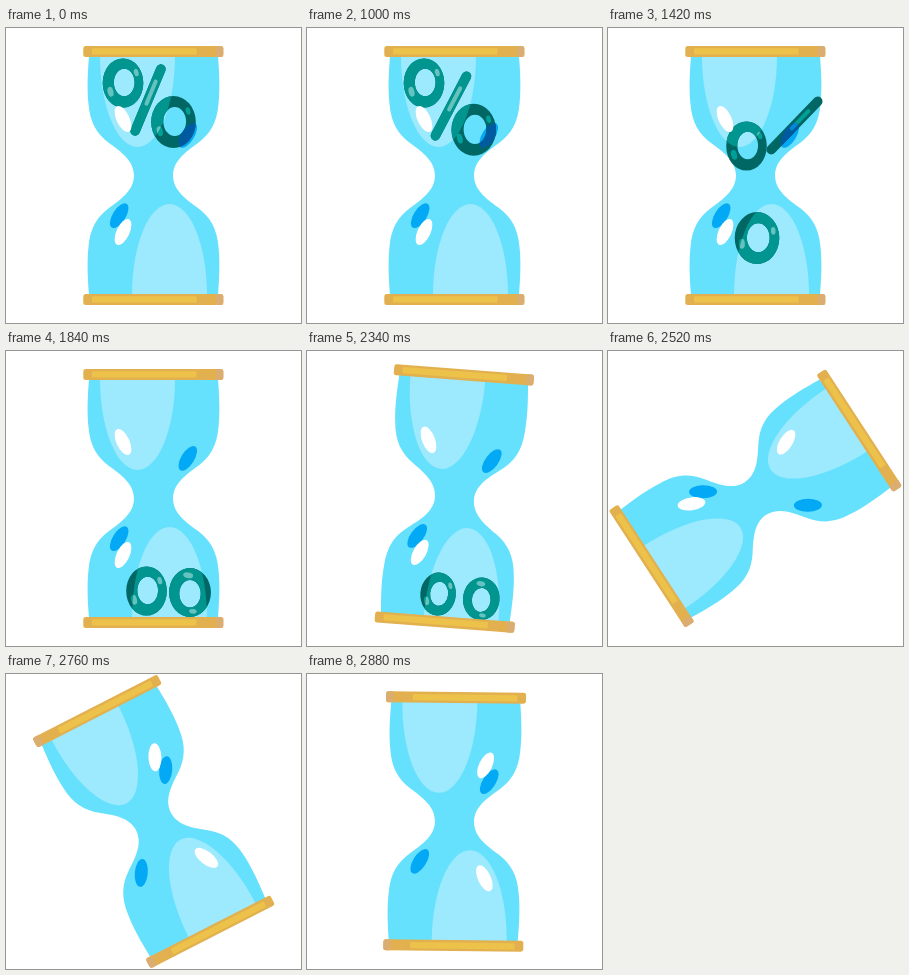
Recreate the animation shown at these times as an HTML page with a canvas. Size 295 px wide and 295 px high, loop 2940 ms.

```html
<!DOCTYPE html>
<html lang="en">
<head>
<meta charset="utf-8">
<title>Percent hourglass</title>
<style>
html, body { margin: 0; width: 100%; height: 100%; overflow: hidden; background: #fff; }
canvas { display: block; width: 100%; height: 100%; }
</style>
</head>
<body>
<canvas></canvas>
<script>
const SIZE = 295, MID = SIZE / 2, LOOP = 2940, STEP = 60;
const FALL_START = 1000, FLIP_START = 2340, LAST_FALL = 15;
const canvas = document.querySelector('canvas');
const ctx = canvas.getContext('2d');

const rad = degrees => degrees * Math.PI / 180;
const smooth = p => p * p * (3 - 2 * p);
// Progress from 0 to 1 while step runs from start to end.
const span = (step, start, end, power = 1) =>
  Math.max(0, Math.min(1, (step - start) / (end - start))) ** power;

function oval(x, y, rx, ry, tilt = 0) {
  const path = new Path2D();
  path.ellipse(x, y, rx, ry, rad(tilt), 0, 2 * Math.PI);
  return path;
}

// Joins a shape with its copy turned upside down, or mirrored top to bottom.
function doubled(shape, scaleX = -1) {
  const path = new Path2D(shape);
  path.addPath(shape, new DOMMatrix([scaleX, 0, 0, -1, scaleX < 0 ? SIZE : 0, SIZE]));
  return path;
}

const glass = doubled(new Path2D(`M83 28C81.5 47 81 62 82.5 76C84 95 91 106 103 115
  C116 124.5 128 133 128 148H167C167 133 179 124.5 192 115
  C204 106 211 95 212.5 76C214 62 213.5 47 212 28Z`));
const panels = doubled(new Path2D('M94 28A37.5 91 0 0 0 169 28Z'));
const blueSpots = doubled(oval(181.8, 107.3, 6.5, 14, 32));
const whiteSpots = doubled(oval(117, 91, 6.5, 14, -25), 1);

// Slides along the left wall, drops through the neck and settles.
function upperRing(step) {
  const slide = span(step, 1, 8), drop = span(step, 8, 12, 1.3), settle = span(step, 12, 15);
  return {
    x: 117 + 21.5 * slide - 22 * Math.sin(Math.PI * slide) - 12.5 * drop + 14.5 * settle,
    y: 55 + 63 * slide + 122 * drop,
    angle: 0, rx: 20.3, ry: 24.6
  };
}

// Sinks into the neck, drops and rolls to the right.
function lowerRing(step) {
  const roll = span(step, 8, LAST_FALL), size = 1 - 0.06 * roll;
  return {
    x: 167.5 - 18.5 * span(step, 0, 5, 2) + 35 * roll,
    y: 94 + 46 * span(step, 0, 5, 1.1) + 101.5 * span(step, 5, 9, 1.29),
    angle: 12 * span(step, 0, 8) + 101 * roll,
    rx: 22.3 * size, ry: 26 * size
  };
}

// Leans on the right wall, tips up and shrinks into the neck.
function slash(step) {
  const lean = span(step, 0, 8, 0.7), tip = span(step, 8, 9), drop = span(step, 9, 13);
  return {
    x: 142 + 44.5 * span(step, 0, 8, 1.5) + 3.5 * tip - 40 * drop,
    y: 72 + 25.5 * lean - 8.5 * tip + 61 * drop,
    angle: 22.6 + 21.4 * lean - 14 * tip - 20 * drop,
    scale: 1 - drop
  };
}

function fill(path, color, rule = 'nonzero') {
  ctx.fillStyle = color;
  ctx.fill(path, rule);
}

function drawRing({ x, y, angle, rx, ry }, left, ink, shine) {
  if (left <= 0) return;
  ctx.save();
  ctx.translate(x - 16 * (1 - left), y + 32 * (1 - left));
  ctx.scale(left, left);
  const ring = oval(0, 0, rx, ry);
  const holeAt = rad(angle - 23);
  ring.addPath(oval(1.3 * Math.cos(holeAt), 1.3 * Math.sin(holeAt), rx * 0.51, ry * 0.56));
  fill(ring, ink, 'evenodd');
  const glint = (at, reach, w, h) => {
    const a = rad(at + angle);
    fill(oval(Math.cos(a) * rx * reach, Math.sin(a) * ry * reach, w, h, angle - 15), shine);
  };
  glint(-33, 0.78, 2.3, 3.8);
  glint(150, 0.71, 2.9, 5);
  ctx.restore();
}

function drawSlash({ x, y, angle, scale }, ink, shine) {
  if (scale <= 0) return;
  const bar = (top, bottom, width, color) => {
    ctx.beginPath();
    ctx.moveTo(0, top);
    ctx.lineTo(0, bottom);
    ctx.lineWidth = width;
    ctx.strokeStyle = color;
    ctx.stroke();
  };
  ctx.save();
  ctx.translate(x, y);
  ctx.rotate(rad(angle));
  ctx.scale(scale, scale);
  ctx.lineCap = 'round';
  bar(-33.5, 33.5, 9.6, ink);
  bar(-20, 4, 4, shine);
  ctx.restore();
}

function drawPercent(step, left, ink, shine, clip) {
  ctx.save();
  if (clip) ctx.clip(clip);
  drawRing(upperRing(step), left, ink, shine);
  drawRing(lowerRing(step), left, ink, shine);
  drawSlash(slash(step), ink, shine);
  ctx.restore();
}

function drawCap(y) {
  const bar = (x, top, w, h, r, color) => {
    ctx.beginPath();
    ctx.roundRect(x, top, w, h, r);
    ctx.fillStyle = color;
    ctx.fill();
  };
  bar(77.3, y, 140, 11, 2.5, '#e2b04e');
  bar(210, y, 7.3, 11, [0, 2.5, 2.5, 0], '#dbad70');
  bar(86, y + 2.2, 104.5, 6.3, 1, '#edc24b');
}

function draw(time) {
  const fall = Math.floor((time - FALL_START) / STEP) + 1;
  const step = Math.max(0, Math.min(LAST_FALL, fall));
  const flip = Math.max(0, Math.floor((time - FLIP_START) / STEP) + 1);
  const turn = 183.5 * smooth(span(flip, 0, 10.8));
  const left = 1 - smooth(span(flip, 0, 4.5));

  const ratio = devicePixelRatio || 1;
  const width = Math.round(innerWidth * ratio), height = Math.round(innerHeight * ratio);
  if (canvas.width !== width || canvas.height !== height) {
    canvas.width = width;
    canvas.height = height;
  }
  ctx.setTransform(width / SIZE, 0, 0, height / SIZE, 0, 0);
  ctx.fillStyle = '#fff';
  ctx.fillRect(0, 0, SIZE, SIZE);
  ctx.translate(MID, MID);
  ctx.rotate(rad(turn));
  ctx.translate(-MID, -MID);

  fill(glass, '#66e1fd');
  fill(panels, '#9de9fd');
  fill(blueSpots, '#03a9f4');
  drawPercent(step, left, '#006764', '#009f98');
  drawPercent(step, left, '#00958f', '#66c2be', panels);
  drawPercent(step, left, '#005aa0', '#0288d1', blueSpots);
  fill(whiteSpots, '#fff');
  drawCap(18);
  drawCap(266);
}

function play() {
  draw(performance.now() % LOOP);
  requestAnimationFrame(play);
}
play();
</script>
</body>
</html>
```
